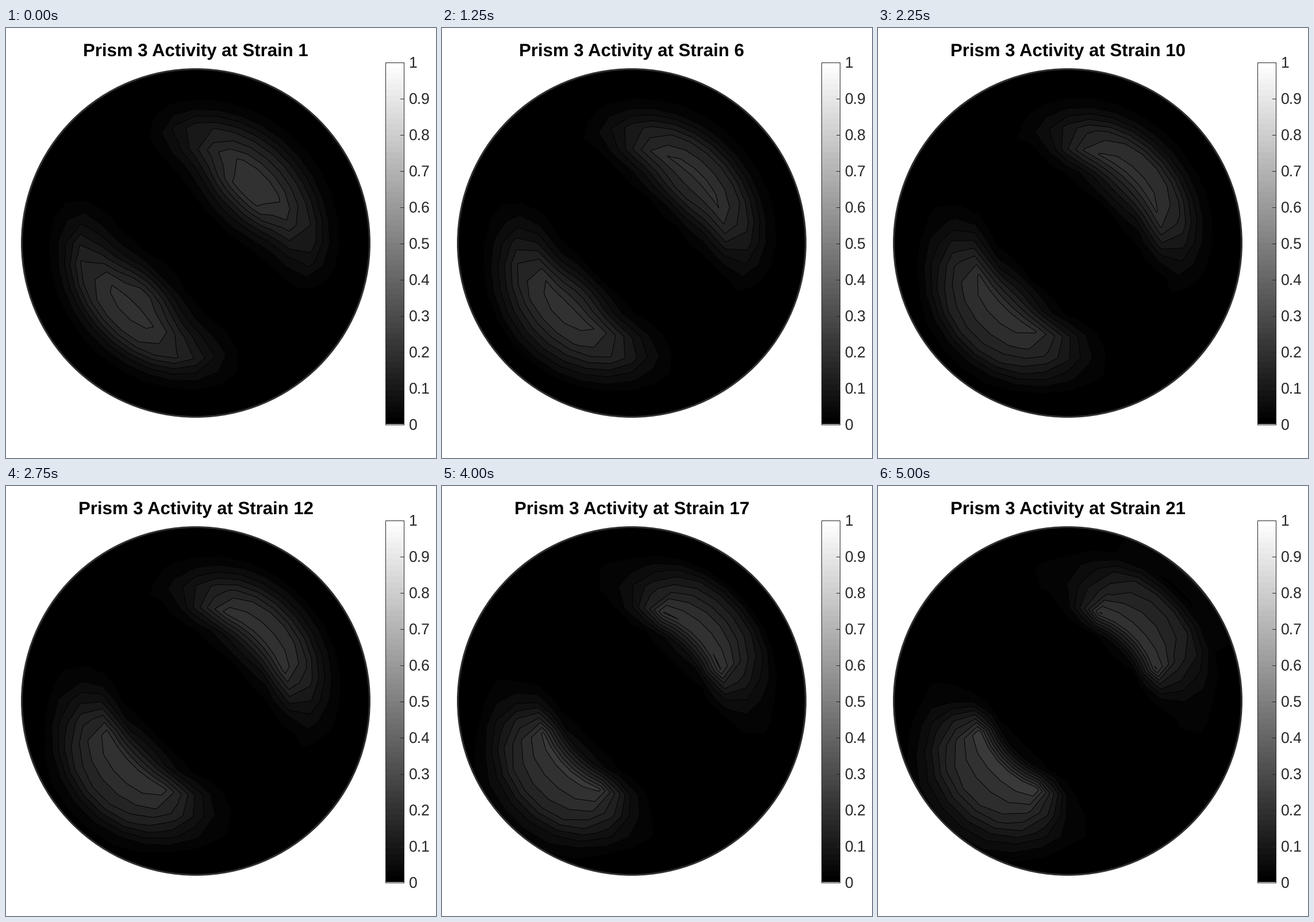
Write a matplotlib script that moves like this. It is 748 px wide and 748 px high and loops after 5250 ms.

```python
import numpy as np
import matplotlib
import matplotlib.pyplot as plt
from matplotlib.animation import FuncAnimation
from matplotlib.patches import Circle, Rectangle

matplotlib.rcParams["text.hinting"] = "none"

SIZE, DPI = 748, 100
PX = 72 / DPI
CX, CY, R = 330, 374, 302.5
INK = "#262626"
FONT = "Liberation Sans"
STRAINS = 21
STEP = 0.025  # activity between contour levels

# Lobe profiles (height, width, power) on the four middle rings,
# at the first, the middle and the last strain.
KEYS = [1, 10, STRAINS]
UPPER = [
    [(8.7, 42, 2.3), (8.25, 53.5, 3.4), (5.2, 62.6, 6.3), (1.7, 66, 8)],
    [(4.3, 40, 2), (8.4, 52, 4.5), (7, 57, 3.2), (2.3, 63, 4)],
    [(1.5, 30, 2), (8.6, 40, 4.2), (7, 42, 3), (5.5, 38, 3)],
]
LOWER = [
    [(7.2, 37, 2), (8.5, 48, 2.6), (6.9, 57, 4.5), (2.4, 64, 6)],
    [(4.6, 35, 2), (8.7, 50, 3.4), (7.3, 53, 3.6), (5.6, 47, 2.2)],
    [(1.7, 38, 2.5), (9.7, 40, 4.5), (8.2, 41, 4.5), (7, 38.5, 2.8)],
]
# Crest heights at 5, 15 and 25 degrees from the axis
UP_AT, UP_CREST = [1, 10, 14, 17, 21], [
    (8.3, 8.4, 9.01, 8.93, 8.6),
    (8.2, 8.4, 9.06, 9.0, 8.75),
    (7.7, 8.1, 9.02, 9.12, 9.05)]
LOW_AT, LOW_CREST = [1, 4, 8, 10, 21], [
    (8.5, 9.02, 8.65, 8.7, 9.7),
    (8.3, 8.4, 8.5, 8.6, 9.75),
    (7.4, 7.6, 7.9, 8.1, 9.8)]

# Equal-area polar grid: 11.25 degree tilt steps, 10 degree rays
ring = R * np.sqrt(2) * np.sin(np.radians(np.arange(9) * 11.25) / 2)
deg = np.arange(0, 361, 10)
X = CX + np.outer(ring, np.cos(np.radians(deg)))
Y = CY - np.outer(ring, np.sin(np.radians(deg)))
off = np.arange(5, 90, 10)


def bell(height, width, power):
    return height * np.exp(-(off / width) ** power)


def lobe(keys, strain, at, crest, skirt):
    i = int(strain >= KEYS[1])
    u = (strain - KEYS[i]) / (KEYS[i + 1] - KEYS[i])
    z = np.zeros((9, off.size))
    for k, (a, b) in enumerate(zip(keys[i], keys[i + 1])):
        z[k + 3] = bell(*a) * (1 - u) + bell(*b) * u
    z[2] = z[3] * z[3, 0] ** 2 / 175
    z[4, :3] = [np.interp(strain, at, c) for c in crest]
    z[5:7] = np.maximum(z[5:7], bell(skirt, 66, 8))
    return z


def field(strain):
    up = lobe(UPPER, strain, UP_AT, UP_CREST, 1.55)
    low = lobe(LOWER, strain, LOW_AT, LOW_CREST, 1.6 - 0.025 * (strain - 1))
    # Activity reaches the rim late in the upper lobe, steadily in the lower
    late = max(0, (strain - 17) / 4)
    up[7], up[8] = bell(1.25 * late, 45, 3), bell(2.2 * late, 27, 4)
    up[7, 0] *= 0.68
    low[7] = bell(4.1 * (strain - 1) / 20, 33, 2.6)
    low[8] = bell(1.9 * max(0, (strain - 10) / 11), 26, 4)

    z = np.zeros(X.shape)
    for j, a in enumerate(deg):
        d = abs((a - 45 + 180) % 360 - 180)
        z[:, j] = up[:, d // 10] if d < 90 else low[:, (180 - d) // 10]
    return z


def gray(v):
    return str(min(int(v * 64), 63) / 63)


fig = plt.figure(figsize=(SIZE / DPI, SIZE / DPI), dpi=DPI, facecolor="white")
ax = fig.add_axes([0, 0, 1, 1])
ax.axis("off")

title = ax.text(CX, 49, "", ha="center", va="baseline", weight="bold",
                family=FONT, size=31.1 * PX, color="black")
ax.add_patch(Circle((CX, CY), R, fc="black", ec="none", zorder=1))
ax.add_patch(Circle((CX, CY), R, fc="none", ec="#303030", lw=3 * PX, zorder=5))

# Colour bar
left, right, top, bottom = 660.5, 692.5, 59.5, 689.5
ax.imshow(np.linspace(1, 0, 64)[:, None], cmap="gray", vmin=0, vmax=1,
          extent=(left, right, bottom, top), aspect="auto",
          interpolation="nearest")
ax.add_patch(Rectangle((left, top), right - left, bottom - top,
                       fc="none", ec=INK, lw=PX, zorder=4))
for k in range(11):
    y = bottom + (top - bottom) * k / 10
    ax.plot([right - 6, right], [y, y], color=INK, lw=PX, zorder=4)
    ax.text(701, y + 9.8, f"{k / 10:g}", va="baseline",
            family=FONT, size=26.5 * PX, color=INK)

ax.set_xlim(0, SIZE)
ax.set_ylim(SIZE, 0)

levels = np.arange(1, 12)
shades = [gray(k * STEP) for k in levels[:-1]]
drawn = []


def update(i):
    while drawn:
        drawn.pop().remove()
    z = field(i + 1)
    drawn.append(ax.contourf(X, Y, z, levels=levels, colors=shades, zorder=2))
    drawn.append(ax.contour(X, Y, z, levels=levels[levels < z.max()],
                            colors="black", linewidths=PX, zorder=3))
    title.set_text(f"Prism 3 Activity at Strain {i + 1}")
    return []


anim = FuncAnimation(fig, update, frames=STRAINS, interval=250,
                     init_func=lambda: [], repeat=True, repeat_delay=0,
                     blit=False)
plt.show()
```
